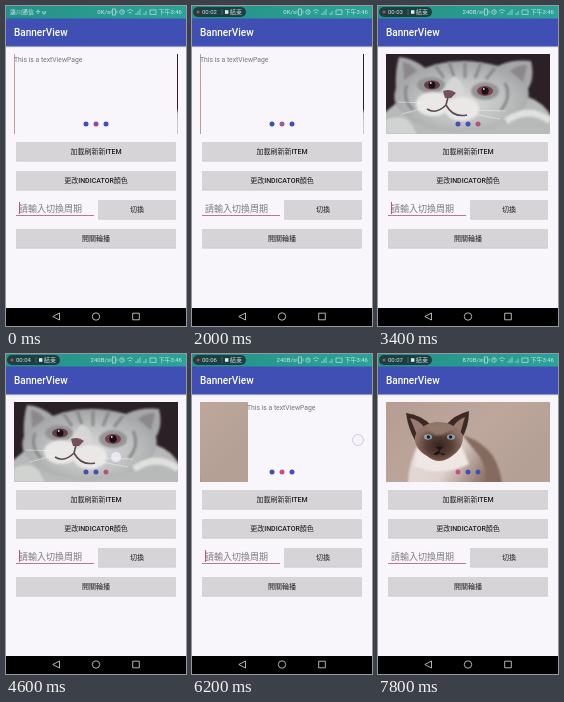
Recreate the animation shown at these times as an HTML page. Size 180 by 320 pixels, loop 8 s.

```html
<!DOCTYPE html>
<html lang="zh-Hant">
<head>
<meta charset="utf-8">
<title>BannerView</title>
<style>
html, body { margin: 0; width: 100%; height: 100%; overflow: hidden; background: #f8f6fa; }
svg { display: block; width: 100vw; height: 100vh; }
text { font-family: Roboto, "Noto Sans CJK TC", "Noto Sans CJK SC", "Noto Sans CJK", sans-serif; }
.status { font-size: 6px; fill: #d0e8e5; }
.thin { fill: none; stroke: #c2e2de; stroke-width: .7; }
.nav { fill: none; stroke: #e0e0e0; stroke-width: .8; stroke-linejoin: round; }
.button text { font-size: 7px; font-weight: 500; text-anchor: middle; fill: #1c1c1e; }
</style>
</head>
<body>
<svg viewBox="0 0 180 320" preserveAspectRatio="none">
  <defs>
    <clipPath id="window"><rect x="8" y="48" width="164" height="80"/></clipPath>
    <clipPath id="photo"><rect width="164" height="80"/></clipPath>
    <linearGradient id="teal"><stop stop-color="#259188"/><stop offset="1" stop-color="#2ba398"/></linearGradient>
    <linearGradient id="wall" x2="1" y2=".5"><stop stop-color="#b59d92"/><stop offset=".6" stop-color="#bda79d"/><stop offset="1" stop-color="#b5a096"/></linearGradient>
    <radialGradient id="fur" cy=".6"><stop stop-color="#d9dad9"/><stop offset=".6" stop-color="#bfc1c1"/><stop offset="1" stop-color="#a6a8a9"/></radialGradient>
    <radialGradient id="mask" cy=".6"><stop stop-color="#33231f"/><stop offset=".55" stop-color="#593f35"/><stop offset="1" stop-color="#8f7466"/></radialGradient>
    <linearGradient id="coat" x2="1" y2=".3"><stop stop-color="#e6dcd8"/><stop offset=".55" stop-color="#dfd2cc"/><stop offset="1" stop-color="#8d7165"/></linearGradient>
    <filter id="soft"><feGaussianBlur stdDeviation="1.2"/></filter>
  </defs>

  <rect width="180" height="320" fill="#f8f6fa"/>
  <rect y="40" width="180" height="1.2" fill="#b9b9d2"/>
  <rect y="12" width="180" height="28.3" fill="#3f4fb4"/>
  <text x="8" y="30.3" font-size="10" font-weight="500" fill="#fff">BannerView</text>

  <rect width="180" height="12.5" fill="url(#teal)"/>
  <text id="carrier" class="status" x="4" y="8.3">遠川通信 ✢ ψ</text>
  <g id="recorder">
    <rect x="1" y="1" width="53" height="10" rx="5" fill="#1d3f41"/>
    <circle cx="6" cy="6" r="1.5" fill="#b9504c"/>
    <text id="clock" class="status" x="10" y="8.2"></text>
    <path d="M30 3V9" stroke="#5d7f7d" stroke-width=".6"/>
    <rect x="33" y="4.2" width="3.4" height="3.6" fill="#d9efec"/>
    <text class="status" x="38" y="8.2">結束</text>
  </g>
  <text id="speed" class="status" x="104" y="8.3" text-anchor="end"></text>
  <g class="thin">
    <rect x="106.5" y="3" width="3" height="6"/><path d="M105 4.5v3M111 4.5v3"/>
    <circle cx="116" cy="6" r="2.3"/><path d="M116 4.5V6h1.3"/>
    <path d="M121 5q3-3 6 0M122.5 7q1.5-1.5 3 0M124 8.5v.5M130 9V7m2 2V5m2 4V3M138 9V7m2 2V5"/>
    <rect x="144" y="4" width="6" height="4.3"/>
  </g>
  <text class="status" x="176" y="8.3" text-anchor="end">下午3:46</text>

  <g clip-path="url(#window)">
    <g id="pages">
      <g transform="translate(8 48)" clip-path="url(#photo)">
        <rect width="164" height="80" fill="url(#wall)"/>
        <g filter="url(#soft)">
          <path d="M22 82Q23 58 32 43L76 34Q95 38 106 53Q114 65 116 82Z" fill="url(#coat)"/>
          <path d="M76 33Q96 39 106 53Q114 65 116 82H99Q102 63 89 49Z" fill="#846a5e"/>
          <path d="M32 43Q49 66 75 43L83 62Q55 76 28 64Z" fill="#eee7e4"/>
        </g>
        <path d="M20 11Q35 13 45 23L30 40Q22 27 20 11Z" fill="#3b2925"/>
        <path d="M83 9Q68 13 60 23L75 38Q83 25 83 9Z" fill="#3b2925"/>
        <path d="M24 16Q33 18 38 25L31 33ZM79 15Q71 18 67 25L74 32Z" fill="#987a70"/>
        <path d="M29 34Q37 20 52 20Q68 20 77 33Q78 46 66 54Q53 64 41 54Q28 47 29 34Z" fill="url(#mask)"/>
        <path d="M38 26Q52 19 68 26L56 33H49Z" fill="#92786a" filter="url(#soft)"/>
        <ellipse cx="42" cy="35" rx="4" ry="2.7" fill="#8ba2b4"/><circle cx="42.4" cy="35" r="1.7" fill="#161a23"/>
        <ellipse cx="65" cy="35" rx="4" ry="2.7" fill="#8ba2b4"/><circle cx="64.6" cy="35" r="1.7" fill="#161a23"/>
        <path d="M50 45H57L53.5 48ZM53.5 48v3q-3 3-6 1m6-1q3 3 6 1" fill="#1b1312" stroke="#1b1312" stroke-width=".6"/>
      </g>
      <text x="171" y="55.6" font-size="6.8" fill="#777579">This is a textViewPage</text>
      <g transform="translate(334 48)" clip-path="url(#photo)">
        <rect width="164" height="80" fill="#2c2027"/>
        <g filter="url(#soft)">
          <path d="M-3 83V60L14 46 142 43Q158 48 167 65V83Z" fill="#b8b9b9"/>
          <path d="M13 3Q27 4 39 14Q72 1 112 12Q127 5 145 7Q149 24 142 35Q146 51 128 64Q101 79 69 77Q31 76 15 57Q5 48 10 34Q9 17 13 3Z" fill="url(#fur)"/>
        </g>
        <g filter="url(#soft)">
          <path d="M17 8Q25 9 31 17L18 26ZM141 11Q132 10 124 17L137 28Z" fill="#8c878b"/>
          <path d="M49 11 58 24M63 8 68 23M79 8 79 24M95 9 89 24M109 14 100 25M119 29Q126 43 115 56M21 31Q16 45 27 56" fill="none" stroke="#86898b" stroke-width="3"/>
          <ellipse cx="45" cy="31" rx="14" ry="8" fill="#949496"/>
          <ellipse cx="99" cy="37" rx="14" ry="9" fill="#949496"/>
          <path d="M67 22Q80 27 78 43L55 38Z" fill="#d5d6d5"/>
          <ellipse cx="47" cy="50" rx="17" ry="12" fill="#e9e8e7"/>
          <ellipse cx="76" cy="55" rx="17" ry="12" fill="#e9e8e7"/>
          <path d="M0 66Q14 59 24 68L31 80H0Z" fill="#d1d3d1"/>
          <path d="M120 67Q143 51 164 67" fill="none" stroke="#e0e0df" stroke-width="7"/>
        </g>
        <ellipse cx="46" cy="31" rx="8" ry="4.5" fill="#664048"/><circle cx="46" cy="31" r="3.5" fill="#181116"/>
        <ellipse cx="99" cy="37" rx="8" ry="5" fill="#7a424b"/><circle cx="99" cy="37" r="3.7" fill="#181116"/>
        <path d="M44 29h1.5M97 35h1.5" stroke="#fff" stroke-width="1.3"/>
        <path d="M57 37Q64 34 70 39L65 44H59Z" fill="#755057"/>
        <path d="M62 43 60 51Q50 61 41 55M60 51Q67 64 81 61" fill="none" stroke="#5b4c52" stroke-width="1.6"/>
        <path d="M42 49 12 48M42 53 16 60M83 56 119 57M82 59 114 65" stroke="#f2f0f0" stroke-width=".5"/>
      </g>
    </g>
  </g>
  <g id="dots"><circle cx="80" cy="118" r="2.5"/><circle cx="90" cy="118" r="2.5"/><circle cx="100" cy="118" r="2.5"/></g>

  <g id="buttons"></g>
  <text x="13" y="206" font-size="9" fill="#7d7b80">請輸入切換周期</text>
  <path d="M10 209.5H88" stroke="#bd7888"/>
  <path id="caret" d="M13.5 196V208" stroke="#b9546f"/>

  <circle id="touch" r="5.5" fill="#f5f3fa" fill-opacity=".75" stroke="#c7c3df" stroke-width=".8"/>

  <rect y="302" width="180" height="18" fill="#000"/>
  <g class="nav"><path d="M53.5 307V314L46.8 310.5Z"/><circle cx="90" cy="310.5" r="3.7"/><rect x="126.7" y="307.2" width="6.6" height="6.6"/></g>
</svg>
<script>
const LOOP = 8000, STEP = 200, PAGE = 163;
const $ = id => document.getElementById(id);

const scroll = [[0, 163], [2000, 163], [2200, 250], [2400, 310], [2600, 325], [2800, 326], [4800, 326],
  [5000, 300], [5200, 265], [5400, 200], [5600, 170], [5800, 163], [6000, 150], [6200, 116],
  [6400, 60], [6600, 15], [6800, 0], [7000, 3], [7200, 21], [7400, 7], [7600, 0], [8000, 0]];
const touches = [[0], [4600, 110, 103], [4800, 113, 101], [5000, 139, 94], [5200, 173, 88], [5400],
  [5800, 119, 92], [6000, 132, 90], [6200, 166, 86], [6400], [7000, 124, 95], [7200, 106, 96], [7400]];
const carets = [[0, 1], [600, 0], [1000, 1], [1600, 0], [3200, 1], [3600, 0], [4600, 1], [5000, 0],
  [5400, 1], [5600, 0], [6000, 1], [6400, 0], [7000, 1], [7400, 0]];
const speeds = [[0, '0K/s'], [3200, '240B/s'], [6600, '2.0K/s'], [7400, '870B/s']];
const tints = [[0, '#8d5090'], [1000, '#9a6080'], [2200, '#b85272'], [5400, '#cc4c82'], [6600, '#dc5090'], [7400, '#c4508c']];

const hold = (table, t) => table.findLast(row => row[0] <= t);
function glide(table, t) {
  const i = table.findIndex(row => row[0] > t);
  const [t0, a] = table[i - 1], [t1, b] = table[i];
  return a + (b - a) * (t - t0) / (t1 - t0);
}

function button(x, y, width, label) {
  return `<g class="button"><rect x="${x}" y="${y + .6}" width="${width}" height="18.9" rx="1" fill="#c4c2c6"/>
    <rect x="${x}" y="${y}" width="${width}" height="18.7" rx="1" fill="#d6d4d7"/>
    <text x="${x + width / 2}" y="${y + 12.2}">${label}</text></g>`;
}
$('buttons').innerHTML = button(10, 136, 160, '加載刷新新ITEM') + button(10, 165, 160, '更改INDICATOR顏色')
  + button(92, 194, 78, '切換') + button(10, 223, 160, '開關輪播');

const show = (id, on) => $(id).setAttribute('visibility', on ? 'visible' : 'hidden');

function draw(t) {
  const x = glide(scroll, t), page = Math.round(x / PAGE);
  $('pages').setAttribute('transform', `translate(${-x} 0)`);
  [...$('dots').children].forEach((dot, i) =>
    dot.setAttribute('fill', i === page ? hold(tints, t)[1] : '#3f51b5'));

  const [, tx, ty] = hold(touches, t);
  show('touch', tx);
  if (tx) $('touch').setAttribute('transform', `translate(${tx} ${ty})`);

  show('caret', hold(carets, t)[1]);
  show('carrier', t < STEP);
  show('recorder', t >= STEP);
  $('clock').textContent = `00:0${Math.floor(t / 1000)}`;
  $('speed').textContent = hold(speeds, t)[1];
}

const start = performance.now();
function tick() {
  const t = (performance.now() - start) % LOOP;
  draw(Math.floor(t / STEP) * STEP);
  requestAnimationFrame(tick);
}
tick();
</script>
</body>
</html>
```
